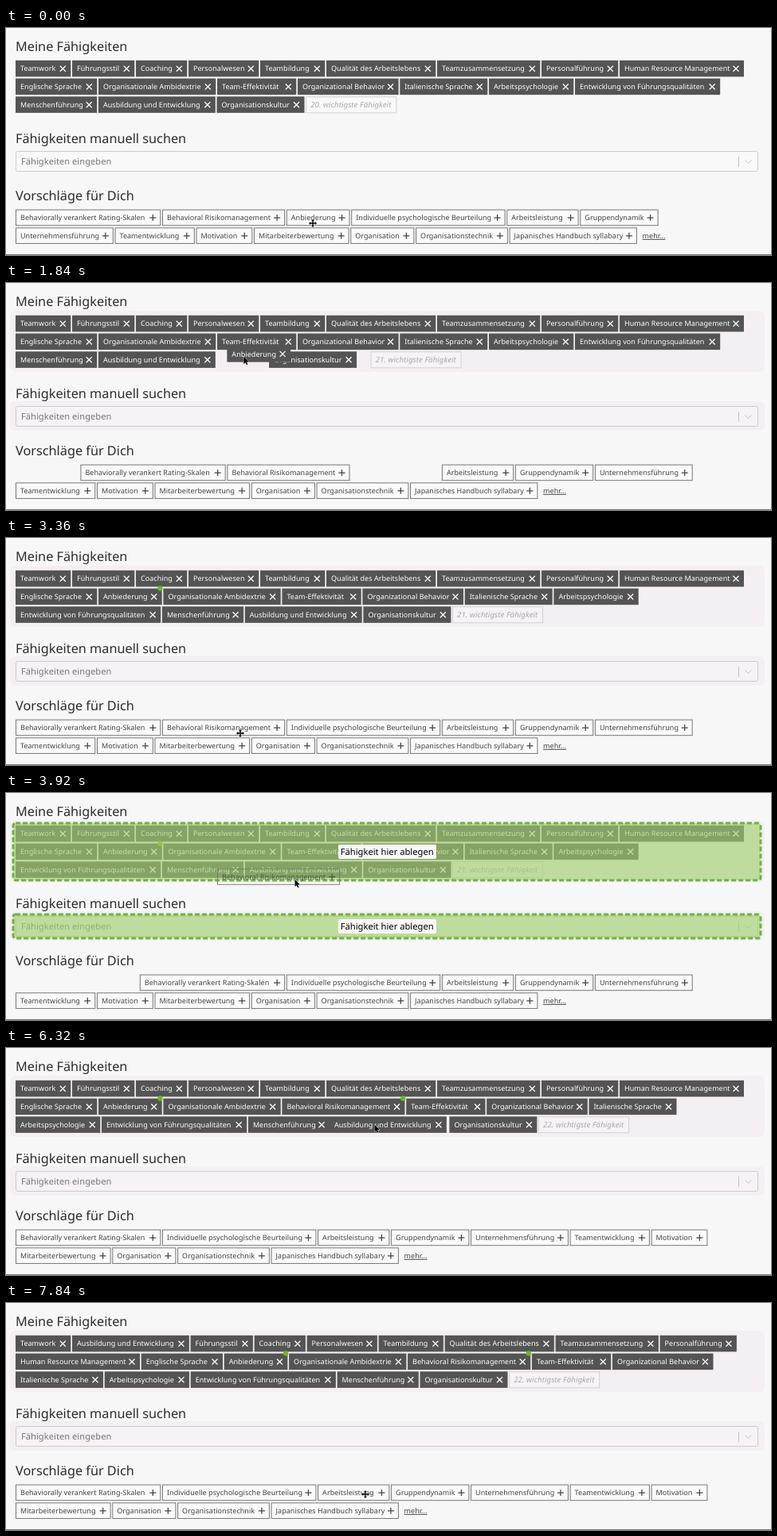
An HTML page for the animation above (8000 ms loop, 960 by 286 pixels).

```html
<!DOCTYPE html>
<html lang="de">
<head>
<meta charset="utf-8">
<title>Meine Fähigkeiten</title>
<style>
html, body { margin: 0; width: 100%; height: 100%; overflow: hidden; background: #f7f7f7; }
svg { display: block; width: 960px; height: 286px; }
text { font: 9px "Noto Sans", "Open Sans", sans-serif; letter-spacing: .04px; text-rendering: geometricPrecision; }
.head { font-size: 16.25px; font-weight: 300; letter-spacing: 0; fill: #2c2c2c; }
.field { font-size: 11.1px; fill: #777; }
.label { font-size: 11.2px; font-weight: 500; letter-spacing: 0; fill: #000; }
.next { font-size: 9.7px; font-style: italic; fill: #aaa; }
.more { text-decoration: underline; fill: #444; }
.skill rect { fill: #545454; }
.skill text { fill: #fff; }
.skill path { stroke: #fff; }
.offer rect { fill: #fafafa; stroke: #777; }
.offer text { fill: #444; }
.offer path { stroke: #444; }
.offer.ghost rect { fill: none; }
.offer.ghost { opacity: .9; }
.tag path { fill: none; stroke-width: 1.25; }
.zone { fill: #a2d06f; fill-opacity: .64; stroke: #70b33c; stroke-width: 3; stroke-dasharray: 6 3; }
</style>
</head>
<body>
<svg viewBox="0 0 960 286">
  <rect width="960" height="286" fill="#f7f7f7"/>
  <g id="tint" fill="#f4eff2">
    <rect x="5" y="35" width="947" height="77" rx="7"/>
    <rect x="5" y="149" width="947" height="37" rx="7"/>
  </g>
  <rect y="285" width="960" height="1" fill="#777"/>
  <text class="head" x="12" y="29">Meine Fähigkeiten</text>
  <text class="head" x="12" y="144.5">Fähigkeiten manuell suchen</text>
  <text class="head" x="12" y="217">Vorschläge für Dich</text>
  <rect x="12.5" y="155.5" width="931" height="25" rx="2" fill="#fff" fill-opacity=".2" stroke="#ccc"/>
  <text class="field" x="19" y="172.3">Fähigkeiten eingeben</text>
  <path d="M919.5 162V175M927.5 166.5L931.5 170.5L935.5 166.5" fill="none" stroke="#c4c4c4"/>
  <g id="next">
    <rect x=".5" y=".5" width="113" height="20" fill="#fff" fill-opacity=".2" stroke="#d2d2d2"/>
    <text class="next" x="6" y="13.8"></text>
  </g>
  <g id="skills"></g>
  <g id="offers"></g>
  <text id="more" class="more" y="13.6">mehr...</text>
  <g id="zones">
    <rect class="zone" x="9" y="38" width="938" height="72" rx="3"/>
    <rect class="zone" x="9" y="153" width="938" height="30" rx="3"/>
    <rect x="417" y="65" width="123" height="18" rx="2" fill="#f8f8f8"/>
    <rect x="417" y="159" width="123" height="18" rx="2" fill="#f8f8f8"/>
    <text class="label" x="419.7" y="78">Fähigkeit hier ablegen</text>
    <text class="label" x="419.7" y="172">Fähigkeit hier ablegen</text>
  </g>
  <g id="ghosts"></g>
  <g id="cursor" stroke="#fff" stroke-width=".8" paint-order="stroke">
    <path id="arrow" d="M0 0V9L2 7.2L3.5 10.3L5 9.6L3.6 6.6H6.3Z"/>
    <path id="cross" transform="translate(2.5 3.5)" d="M0 -5L2 -2.8H.7V-.7H2.8V-2L5 0L2.8 2V.7H.7V2.8H2L0 5L-2 2.8H-.7V.7H-2.8V2L-5 0L-2.8 -2V-.7H-.7V-2.8H-2Z"/>
  </g>
</svg>
<script>
const LOOP = 8000, LEFT = 12, RIGHT = 940, PITCH = 22.75, GAP = 1.7, HEIGHT = 20.6;
const SKILL_TOP = 40.8, OFFER_TOP = 228.6, SHIFT_MS = 300;

// Width of each tag including the gap after it
const widths = {
  'Teamwork': 71, 'Führungsstil': 80, 'Coaching': 66, 'Personalwesen': 90, 'Teambildung': 83,
  'Qualität des Arbeitslebens': 139, 'Teamzusammensetzung': 131, 'Personalführung': 98,
  'Human Resource Management': 157.7, 'Englische Sprache': 104, 'Organisationale Ambidextrie': 149,
  'Team-Effektivität': 101, 'Organizational Behavior': 128.3, 'Italienische Sprache': 111.7,
  'Arbeitspsychologie': 108, 'Entwicklung von Führungsqualitäten': 183.9, 'Menschenführung': 103.9,
  'Ausbildung und Entwicklung': 148.6, 'Organisationskultur': 111.7,
  'Behaviorally verankert Rating-Skalen': 184, 'Behavioral Risikomanagement': 155.8, 'Anbiederung': 81.4,
  'Individuelle psychologische Beurteilung': 195.1, 'Arbeitsleistung': 92, 'Gruppendynamik': 100,
  'Unternehmensführung': 124.5, 'Teamentwicklung': 102, 'Motivation': 72.5,
  'Mitarbeiterbewertung': 121.3, 'Organisation': 81.8, 'Organisationstechnik': 117.5,
  'Japanisches Handbuch syllabary': 162
};
const names = Object.keys(widths);
const firstSkills = names.slice(0, 19), firstOffers = names.slice(19);

// steps: [time, insertion index] while the tag hovers over the list
const drags = [
  { name: 'Anbiederung', fromPool: true, grab: 460, hover: 1120, drop: 2640, end: 2800, off: [21, 14],
    steps: [[1120, 19], [1690, 18], [2040, 11], [2320, 10]] },
  { name: 'Behavioral Risikomanagement', fromPool: true, grab: 3420, hover: 3990, drop: 5300, end: 5500, off: [97.5, 13.7],
    steps: [[3990, 20], [4040, 18], [4240, 17], [4400, 13], [4480, 12], [4600, 11], [4977, 12]] },
  { name: 'Ausbildung und Entwicklung', fromPool: false, grab: 6240, hover: 6240, drop: 7000, end: 7190, off: [56.5, 10.2],
    steps: [[6440, 18], [6560, 17], [6640, 11], [6760, 10], [6860, 1]] }
];

// Pointer hot spot: time, x, y
const track = [
  [0, 382.5, 242.5], [240, 382.5, 242.5], [460, 373, 242.5], [1120, 335, 112], [1500, 330, 100],
  [1840, 298.5, 93], [2320, 150, 78], [2600, 140, 77], [2800, 140, 77], [3280, 291.5, 242.5],
  [3360, 291.5, 242.5], [3420, 293.5, 242.5], [3920, 362.5, 109], [4200, 375, 100], [4500, 370, 84],
  [4710, 365, 76], [4810, 365, 76], [5040, 374.5, 76.5], [5220, 435, 68], [5300, 442, 70],
  [5470, 442, 70], [6150, 464.5, 96.5], [6240, 464.5, 96.5], [6320, 462.5, 96.5], [6700, 300, 72],
  [7000, 143, 46], [7130, 143, 46], [7760, 448.5, 237.5], [8000, 448.5, 237.5]
];

const $ = id => document.getElementById(id);
const clamp = v => Math.max(0, Math.min(1, v));
const lerp = (a, b, p) => a + (b - a) * p;
const place = (el, x, y) => el.setAttribute('transform', `translate(${x.toFixed(2)} ${y.toFixed(2)})`);
const show = (el, on) => el.setAttribute('visibility', on ? 'visible' : 'hidden');

function add(parent, tag, attrs, text) {
  const el = document.createElementNS('http://www.w3.org/2000/svg', tag);
  for (const key in attrs) el.setAttribute(key, attrs[key]);
  if (text) el.textContent = text;
  return parent.appendChild(el);
}

function makeTag(parent, name, kind, dot) {
  const w = widths[name] - GAP, cx = w - 10, cy = 10.4, offer = kind.startsWith('offer');
  const g = add(parent, 'g', { class: 'tag ' + kind });
  const inset = offer ? .5 : 0;
  add(g, 'rect', { x: inset, y: inset, width: w - 2 * inset, height: HEIGHT - 2 * inset });
  add(g, 'text', { x: 6, y: 13.6 }, name);
  add(g, 'path', { d: offer
    ? `M${cx - 4} ${cy}h8M${cx} ${cy - 4}v8`
    : `M${cx - 3.5} ${cy - 3.5}l7 7m0 -7l-7 7` });
  if (dot) add(g, 'circle', { cx: w - 2.3, cy: 0, r: 3.2, fill: '#6fb52c' });
  return g;
}

// CSS "ease" curve
function ease(p) {
  if (p <= 0) return 0;
  if (p >= 1) return 1;
  let lo = 0, hi = 1, u = .5;
  const curve = (a, b) => 3 * (1 - u) * (1 - u) * u * a + 3 * (1 - u) * u * u * b + u * u * u;
  for (let i = 0; i < 20; i++) {
    u = (lo + hi) / 2;
    if (curve(.25, .25) < p) lo = u; else hi = u;
  }
  return curve(.1, 1);
}

// Monotone spline through the track
function along(t, axis) {
  let k = 0;
  while (k < track.length - 2 && track[k + 1][0] <= t) k++;
  const slope = i => track[i + 1] && track[i]
    ? (track[i + 1][axis] - track[i][axis]) / (track[i + 1][0] - track[i][0]) : 0;
  const tangent = i => {
    const a = slope(i - 1), b = slope(i);
    return a * b > 0 ? 2 * a * b / (a + b) : 0;
  };
  const [a, b] = [track[k], track[k + 1]], span = b[0] - a[0], u = (t - a[0]) / span;
  const s = u * u * (3 - 2 * u);
  return lerp(a[axis], b[axis], s)
    + span * u * (1 - u) * ((1 - u) * tangent(k) - u * tangent(k + 1));
}

// Flow layout; the last entry is the spot after all tags
function flow(list, top, tail) {
  let x = LEFT, y = top;
  return [...list, null].map(name => {
    const w = name ? widths[name] : tail;
    if (x > LEFT && x + w - GAP > RIGHT) { x = LEFT; y += PITCH; }
    const spot = { x, y };
    x += w;
    return spot;
  });
}

const skillTags = {}, offerTags = {};
for (const name of [...firstSkills, ...drags.filter(d => d.fromPool).map(d => d.name)])
  skillTags[name] = makeTag($('skills'), name, 'skill', !firstSkills.includes(name));
for (const name of firstOffers) offerTags[name] = makeTag($('offers'), name, 'offer');
for (const d of drags) {
  d.asSkill = makeTag($('ghosts'), d.name, 'skill');
  d.asOffer = makeTag($('ghosts'), d.name, 'offer ghost');
}

function shiftShare(drag, home, i, t) {
  const inside = target => +(i >= target && i < home);
  let last = home, share = 0;
  for (const [at, target] of drag.steps) {
    if (t < at) break;
    share += (inside(target) - inside(last)) * ease((t - at) / SHIFT_MS);
    last = target;
  }
  return share;
}

function draw(t) {
  const px = along(t, 1), py = along(t, 2);
  let skills = [...firstSkills], offers = [...firstOffers], drag = null;
  for (const d of drags) {
    if (t >= d.end) {
      skills = skills.filter(n => n !== d.name);
      skills.splice(d.steps[d.steps.length - 1][1], 0, d.name);
      offers = offers.filter(n => n !== d.name);
    } else if (t >= d.grab) drag = d;
  }
  const pooled = drag && drag.fromPool, hovering = drag && t >= drag.hover;
  const zoneOn = pooled && !hovering && t >= drag.grab + 60;
  let overTag = false;

  const put = (el, name, x, y, visible) => {
    show(el, visible);
    place(el, x, y);
    if (visible && px > x && px < x + widths[name] - GAP && py > y && py < y + HEIGHT) overTag = true;
  };

  // Skill list
  const spots = flow(skills, SKILL_TOP, 116);
  const home = drag && !pooled ? skills.indexOf(drag.name) : Infinity;
  const offset = i => drag ? widths[drag.name] * shiftShare(drag, home, i, t) : 0;
  for (const name in skillTags) if (!skills.includes(name)) show(skillTags[name], false);
  skills.forEach((name, i) =>
    put(skillTags[name], name, spots[i].x + offset(i), spots[i].y, i !== home));
  const end = spots[skills.length];
  const joined = pooled && hovering;
  place($('next'), end.x + (joined ? widths[drag.name] : 0), end.y);
  $('next').lastElementChild.textContent = `${skills.length + 1 + (joined ? 1 : 0)}. wichtigste Fähigkeit`;

  // Suggestions
  const slot = pooled ? offers.indexOf(drag.name) : -1;
  const settled = pooled && t >= drag.drop;
  if (joined) offers.splice(slot, 1);
  const offerSpots = flow(offers, OFFER_TOP, 40);
  const push = pooled && !settled ? widths[drag.name] * ease((t - drag.grab - 170) / SHIFT_MS) : 0;
  for (const name in offerTags) if (!offers.includes(name)) show(offerTags[name], false);
  offers.forEach((name, i) =>
    put(offerTags[name], name, offerSpots[i].x + (i < slot ? push : 0), offerSpots[i].y, i !== slot || settled));
  const tail = offerSpots[offers.length];
  place($('more'), tail.x + 5, tail.y);

  // Dragged tag
  for (const d of drags) {
    show(d.asSkill, d === drag && hovering);
    show(d.asOffer, d === drag && !hovering);
  }
  if (drag) {
    const goal = spots[drag.steps[drag.steps.length - 1][1]];
    const p = ease((t - drag.drop) / 120);
    place(hovering ? drag.asSkill : drag.asOffer,
      lerp(px - drag.off[0], goal.x, p), lerp(py - drag.off[1], goal.y, p));
  }

  show($('tint'), t >= drags[0].hover);
  show($('zones'), zoneOn);
  if (zoneOn) $('zones').setAttribute('opacity', clamp((t - drag.grab - 60) / 150));
  place($('cursor'), px, py);
  show($('cross'), overTag && !zoneOn);
  show($('arrow'), !overTag || zoneOn);
}

function tick() {
  draw(performance.now() % LOOP);
  requestAnimationFrame(tick);
}
tick();
</script>
</body>
</html>
```
